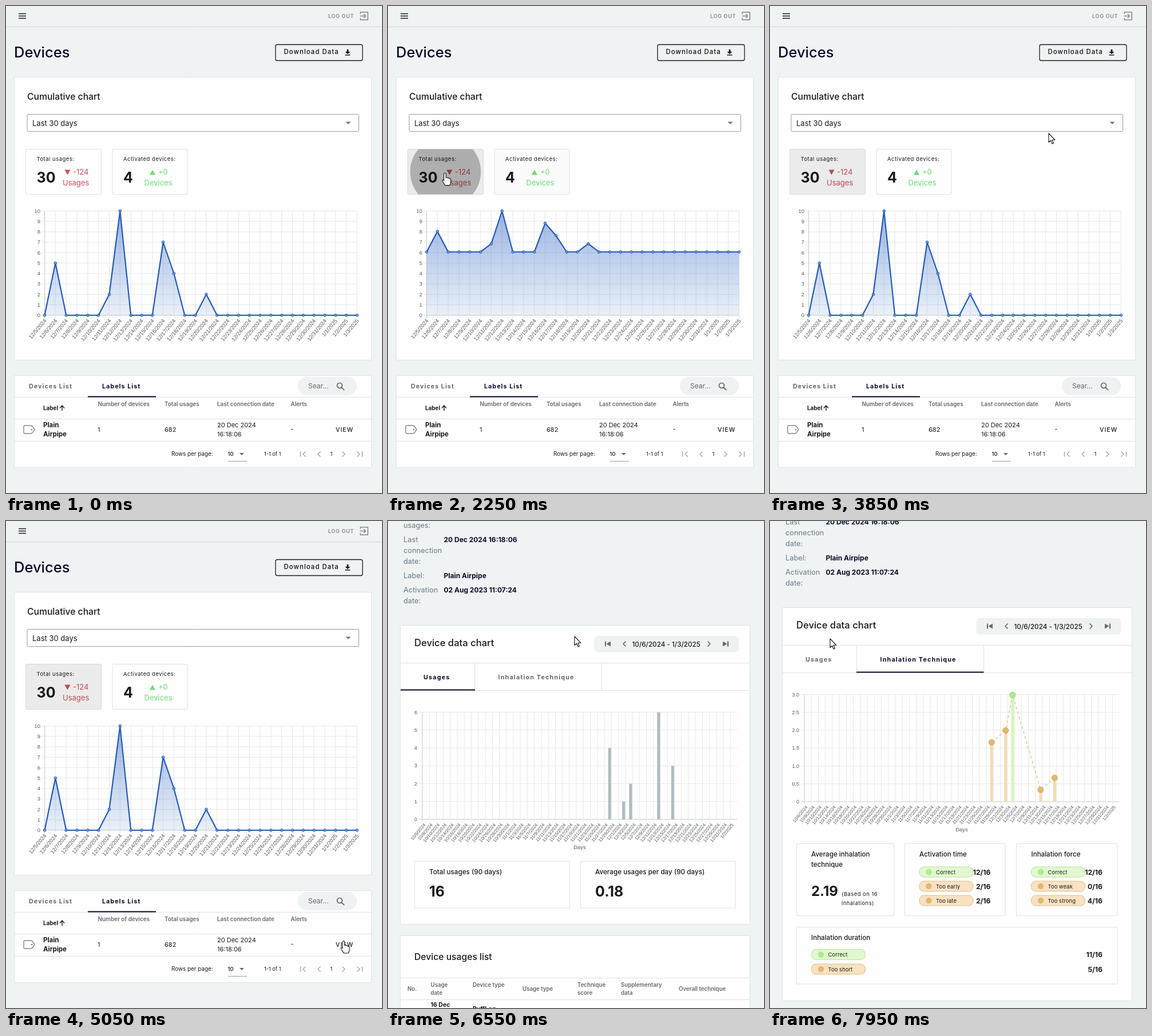
Write an HTML page with a canvas that moves like this. It is 657 px wide and 852 px high and loops after 8000 ms.

```html
<!DOCTYPE html>
<html lang="en">
<head>
<meta charset="utf-8">
<title>Device dashboard</title>
<style>
  html, body { margin: 0; width: 100%; height: 100%; overflow: hidden; background: #f0f3f3; }
  canvas { display: block; }
</style>
</head>
<body>
<canvas id="stage" width="657" height="852"></canvas>
<script>
const ctx = document.getElementById('stage').getContext('2d');
const LOOP = 8000, DAY = 864e5;
const BG = '#f0f3f3', CARD = '#fdfefd', LINE = '#dfe3e4', GRID = '#e5e9ea', AXIS = '#c6cacc';
const INK = '#1b1b1f', NAVY = '#0b0b2b', GRAY = '#66696c', SLATE = '#6b7884';
const GREEN = { bar: '#d6f6ba', dot: '#b0e986', fill: '#e1f7cf', edge: '#b9e69a' };
const ORANGE = { bar: '#f4dab2', dot: '#e4b86d', fill: '#f7e2c2', edge: '#e3bf85' };

// Event times in ms
const SHOW_DEVICES = 1766, SHOW_USAGES = 2165, OPEN_DETAIL = 5250, SCROLL = 6330, SHOW_TECHNIQUE = 7190;

const DAILY_USAGES = Array(30).fill(0);
[[1, 5], [6, 2], [7, 10], [11, 7], [12, 4], [15, 2]].forEach(([i, v]) => DAILY_USAGES[i] = v);
const USAGE_BARS = [[53, 4], [57, 1], [59, 2], [67, 6], [71, 3]];
const TECHNIQUE_BARS = [[53, 5 / 3], [57, 2], [59, 3], [67, 1 / 3], [71, 2 / 3]];

// Pointer path: time, x, y
const POINTER = [
  [1000, 76, 235], [1100, 79, 247], [1300, 79, 247], [1380, 110, 214], [1480, 215, 214], [1650, 251, 306],
  [1900, 251, 306], [2100, 100, 296], [2220, 100, 296], [2480, 92, 216], [2600, 89, 200],
  [2680, 89, 200], [3050, 180, 171], [3200, 180, 171], [3600, 430, 318], [3750, 430, 318],
  [3850, 487, 223], [3950, 487, 223], [4450, 450, 11], [4650, 450, 11], [5000, 590, 735],
  [5500, 590, 735], [5850, 352, 195], [6350, 352, 195], [6550, 326, 202], [7050, 262, 240],
  [7300, 262, 240], [7800, 105, 206]
];
const ARROW = new Path2D('M0 0V15.5L3.6 12.2 6 18 8.4 17 6 11.3H11z');
const HAND = new Path2D('M-2 1.5a1.8 1.8 0 0 1 3.6 0V7.5c1-.8 2.5-.5 3 .6 1-.7 2.4-.2 2.8 1 1.2-.5 2.6.2 2.6 1.7v4.7c0 2-1 3-1.5 5.5H.2c-1-2.5-4-5-5-8.2-.4-1.4 1.4-2.2 2.6-.8L-2 13z');

const clamp = v => Math.min(1, Math.max(0, v));
const mix = (a, b, p) => a + (b - a) * p;
const easeOut = (p, power) => 1 - (1 - clamp(p)) ** power;
const chartEase = elapsed => easeOut(elapsed / 1000, 4);

function text(str, x, y, size, color = INK, weight = 400, spacing = 0, align = 'left', family = 'Inter, sans-serif') {
  ctx.font = `${weight} ${size}px ${family}`;
  ctx.letterSpacing = spacing + 'px';
  ctx.textAlign = align;
  ctx.fillStyle = color;
  ctx.fillText(str, x, y);
}
const tickText = (str, x, y, size, align) =>
  text(str, x, y, size, '#58595b', 400, 0, align, '"Liberation Sans", Arial, sans-serif');

function box(x, y, w, h, fill, stroke, radius = 0, width = 1) {
  ctx.beginPath();
  ctx.roundRect(x, y, w, h, radius);
  if (fill) { ctx.fillStyle = fill; ctx.fill(); }
  if (stroke) { ctx.strokeStyle = stroke; ctx.lineWidth = width; ctx.stroke(); }
}
function line(x1, y1, x2, y2, color = LINE, width = 1) {
  ctx.beginPath();
  ctx.moveTo(x1, y1);
  ctx.lineTo(x2, y2);
  ctx.strokeStyle = color;
  ctx.lineWidth = width;
  ctx.stroke();
}
function disc(x, y, r, fill, stroke) {
  ctx.beginPath();
  ctx.arc(x, y, r, 0, 7);
  ctx.fillStyle = fill;
  ctx.fill();
  if (stroke) { ctx.strokeStyle = stroke; ctx.lineWidth = 1; ctx.stroke(); }
}
function icon(d, x, y, color, width) {
  const path = new Path2D(d);
  ctx.save();
  ctx.translate(x, y);
  if (width) { ctx.strokeStyle = color; ctx.lineWidth = width; ctx.stroke(path); }
  else { ctx.fillStyle = color; ctx.fill(path); }
  ctx.restore();
}
const PREVIOUS = 'M2.5-4.5L-2 0l4.5 4.5', NEXT = 'M-2.5-4.5L2 0l-4.5 4.5';
function pager(xs, y, color, width) {
  ['M-4.5-4.5v9M4.5-4.5L0 0l4.5 4.5', PREVIOUS, NEXT, 'M4.5-4.5v9M-4.5-4.5L0 0l-4.5 4.5']
    .forEach((d, i) => icon(d, xs[i], y, color, width));
}
function dateLabel(start, i, x, y, size) {
  const d = new Date(start + i * DAY);
  ctx.save();
  ctx.translate(x, y);
  ctx.rotate(-50 * Math.PI / 180);
  tickText(`${d.getUTCMonth() + 1}/${d.getUTCDate()}/${d.getUTCFullYear()}`, 0, size * .35, size, 'right');
  ctx.restore();
}

function header() {
  line(0, 36.5, 657, 36.5, '#d6d9da');
  icon('M0 0h13M0 4h13M0 8h13', 22, 13.5, INK, 1.6);
  text('LOG OUT', 563, 20.5, 9, '#85888a', 600, .7);
  icon('M.8 4V.8h13v13.4h-13V11M0 7.5h9.5M6.5 4l3.5 3.5L6.5 11', 618.5, 10, '#85888a', 1.5);
}
function downloadButton(x, y) {
  box(x, y, 152, 28, null, INK, 3, 1.3);
  text('Download Data', x + 14.5, y + 16.5, 11.4, '#111', 500, 1.05);
  icon('M-1.5-5h3v4h3L0 3.2-4.5-1h3zM-4.5 4h9v1.5h-9z', x + 126, y + 13.5, INK);
}

function statCard(x, w, title, count, change, unit, up, shade, rippleTime) {
  box(x, 250.5, w, 79, CARD, LINE, 2);
  text(title, x + 19, 270.5, 9.5, INK, 400, .5);
  text(count, x + 19, 309, 25, INK, 700);
  const color = up ? '#6fdb78' : '#cb525b', changeX = x + (up ? 80 : 82.5);
  const unitX = x + (up ? 55.5 : 64.5);
  const iconX = x + (up ? 70 : 73);
  icon(up ? 'M-5 4.5L0-4.5 5 4.5z' : 'M-5-4.5L0 4.5 5-4.5z', iconX, 291, color);
  text(change, changeX, 295, 13, color);
  text(unit, unitX, 314, 13, color);
  ctx.save();
  box(x, 250.5, w, 79, `rgba(0,0,0,${shade})`, null, 2);
  ctx.clip();
  if (rippleTime > 0 && rippleTime < 500) {
    const alpha = .26 * (1 - clamp((rippleTime - 150) / 350));
    disc(x + w / 2, 290, 97 * easeOut(rippleTime / 300, 3), `rgba(0,0,0,${alpha})`);
  }
  ctx.restore();
}

function usageChart(t) {
  const left = 67.5, right = 613.5, top = 358.5, bottom = 541;
  const max = t >= SHOW_DEVICES && t < SHOW_USAGES ? 4 : 10;
  const xAt = i => mix(left, right, i / 29);
  for (let v = 0; v <= max; v++) {
    const y = mix(bottom, top, v / max);
    line(left - 5, y, right, y, v ? GRID : AXIS);
    tickText(v, 60, y + 3, 9.4, 'right');
  }
  DAILY_USAGES.forEach((_, i) => {
    line(xAt(i), top, xAt(i), bottom + 5, i ? GRID : AXIS);
    dateLabel(Date.UTC(2024, 11, 5), i, xAt(i) + 1, 549, 9.4);
  });
  const toDevices = chartEase(Math.min(t, SHOW_USAGES) - SHOW_DEVICES);
  const toUsages = chartEase(t - SHOW_USAGES);
  const points = DAILY_USAGES.map((v, i) => {
    const share = v / 10;
    return [xAt(i), mix(bottom, top, mix(mix(share, 1, toDevices), share, toUsages))];
  });
  const gradient = ctx.createLinearGradient(0, top, 0, bottom);
  gradient.addColorStop(0, 'rgba(36,88,190,.45)');
  gradient.addColorStop(1, 'rgba(36,98,200,.09)');
  ctx.beginPath();
  points.forEach(p => ctx.lineTo(...p));
  ctx.strokeStyle = '#2659b5';
  ctx.lineWidth = 2.2;
  ctx.lineJoin = 'round';
  ctx.stroke();
  ctx.lineTo(right, bottom);
  ctx.lineTo(left, bottom);
  ctx.fillStyle = gradient;
  ctx.fill();
  points.forEach(([x, y]) => disc(x, y, 2.3, 'rgba(110,155,225,.75)', '#2659b5'));
}

function labelsTable() {
  box(14.5, 646.5, 624, 161, CARD, LINE);
  [684.5, 722.5, 761.5].forEach(y => line(15, y, 638, y));
  text('Devices List', 40, 669, 10.8, GRAY, 700, 1);
  text('Labels List', 168, 669, 10.8, NAVY, 700, 1);
  box(143, 682.5, 119, 2, NAVY);
  box(510, 649, 103, 32, '#eff2f2', null, 16);
  text('Sear...', 528, 669, 12, GRAY);
  icon('M4.5 0a4.5 4.5 0 1 1-9 0a4.5 4.5 0 1 1 9 0M3.2 3.2l5 5', 583, 664, GRAY, 1.7);

  text('Label', 65, 707, 9.9, INK, 700);
  icon('M0 4.5v-9M-4 0l4-4.5L4 0', 98, 703.5, INK, 1.4);
  [['Number of devices', 160.5], ['Total usages', 277], ['Last connection date', 369], ['Alerts', 497.5]]
    .forEach(([s, x]) => text(s, x, 699.5, 9.9, GRAY, 600));

  icon('M2 0h10.5q1.5 0 2.5 1.2L19 7l-4 5.8q-1 1.2-2.5 1.2H2q-2 0-2-2V2q0-2 2-2z', 31, 734, '#85888b', 1.4);
  disc(45, 741, 1.3, '#85888b');
  text('Plain', 65, 737, 11.5, INK, 700);
  text('Airpipe', 65, 753, 11.5, INK, 700);
  text('1', 160, 745, 11);
  text('682', 277, 745, 11);
  text('20 Dec 2024', 369, 736.5, 11);
  text('16:18:06', 369, 753, 11);
  text('-', 497.5, 744, 11);
  text('VIEW', 576, 745, 10.5, INK, 500, 1);

  text('Rows per page:', 289, 787, 9.9);
  text('10', 387.5, 787, 9.4, NAVY, 500);
  icon('M-4-2h8L0 2z', 412, 784, GRAY);
  line(388, 796.5, 421, 796.5, '#999c9f');
  text('1-1 of 1', 451, 787, 9.2);
  text('1', 566.5, 787, 9.2, NAVY);
  pager([519, 547, 590, 618], 784, '#a2a6a8', 1.4);
}

function overview(t, over) {
  header();
  text('Devices', 14, 90, 25.5, NAVY, 500);
  downloadButton(471, 67.5);
  box(14.5, 124.5, 624, 495, CARD, LINE);
  text('Cumulative chart', 37, 164, 15.7, INK, 500);
  box(37, 189.5, 579.5, 30, CARD, over.select ? '#222' : '#999c9e', 2);
  text('Last 30 days', 46, 209.5, 13);
  icon('M-4.5-2h9L0 2.5z', 598, 204.5, '#777');
  statCard(34.5, 132, 'Total usages:', '30', '-124', 'Usages', false,
    t > SHOW_USAGES ? .075 : over.usagesCard ? .05 : 0, t - SHOW_USAGES);
  statCard(186, 131, 'Activated devices:', '4', '+0', 'Devices', true, over.devicesCard ? .05 : 0, t - SHOW_DEVICES);
  usageChart(t);
  labelsTable();
}

function detailChart(t, technique) {
  const left = 60, right = 610.5, top = 539.5, bottom = 727, step = (right - left) / 90;
  const max = technique ? 3 : 6;
  const xAt = i => left + (i + .5) * step;
  for (let k = 0; k <= 6; k++) {
    const y = mix(bottom, top, k / 6);
    line(left - 5, y, right, y, k ? GRID : AXIS);
    tickText(technique && k ? (k / 2).toFixed(1) : k, 51, y + 3, 9, 'right');
  }
  for (let i = 0; i < 90; i += 2) {
    const x = left + i * step;
    line(x, top, x, bottom + 4, i ? GRID : AXIS);
    dateLabel(Date.UTC(2024, 9, 6), i, xAt(i) + 1, 735, 8);
  }
  tickText('Days', 335, 779, 9.4, 'center');

  const grow = chartEase(t - (technique ? SHOW_TECHNIQUE : OPEN_DETAIL));
  const bars = (technique ? TECHNIQUE_BARS : USAGE_BARS).map(([i, v]) => ({
    x: xAt(i), y: mix(bottom, top, v / max * grow), tone: v === 3 ? GREEN : ORANGE
  }));
  bars.forEach(b => box(b.x - 2.5, b.y, 5, bottom - b.y, technique ? b.tone.bar : '#b1babf'));
  if (!technique) return;
  ctx.beginPath();
  bars.forEach(b => ctx.lineTo(b.x, b.y));
  ctx.setLineDash([5, 4]);
  ctx.strokeStyle = '#e6cc98';
  ctx.lineWidth = 1.6;
  ctx.stroke();
  ctx.setLineDash([]);
  bars.forEach(b => disc(b.x, b.y, 5, b.tone.dot, b.tone === GREEN ? '#95d46b' : '#d0a764'));
}

function scoreRow(label, score, x, right, y) {
  const tone = label === 'Correct' ? GREEN : ORANGE;
  box(x, y - 9, 94, 18, tone.fill, tone.edge, 8);
  disc(x + 16.5, y, 5.2, tone.dot);
  text(label, x + 29, y + 3.5, 9.4, INK, 400, .1);
  text(score, right, y + 4.5, 12.2, INK, 700, 0, 'right');
}

function usagesContent() {
  [[46.5, 271, 'Total usages (90 days)', '16'], [336.5, 270.5, 'Average usages per day (90 days)', '0.18']]
    .forEach(([x, w, title, value]) => {
      box(x, 800.5, w, 81.5, CARD, LINE);
      text(title, x + 25.5, 823, 11.7, INK, 500);
      text(value, x + 25.5, 861.5, 25, INK, 700);
    });
  box(21.5, 930.5, 611, 400, CARD, LINE);
  text('Device usages list', 46, 973, 15.7, INK, 500);
  [1004.5, 1042.5].forEach(y => line(22, y, 632, y));
  [['No.', 34, 1027], ['Usage', 74.5, 1020], ['date', 74.5, 1034], ['Device type', 148, 1020],
   ['Usage type', 235, 1027], ['Technique', 331, 1020], ['score', 331, 1034],
   ['Supplementary', 407, 1020], ['data', 407, 1034], ['Overall technique', 508, 1027]]
    .forEach(([s, x, y]) => text(s, x, y, 9.7, GRAY, 600));
  [['16 Dec', 74.5, 1054.5], ['2024', 74.5, 1069], ['PuffLog', 148, 1062], ['Breezetube', 148, 1076.5]]
    .forEach(([s, x, y]) => text(s, x, y, 10.5, INK, 700));
}

function techniqueContent() {
  [[46.5, 170], [235.5, 175.5], [430.5, 176.5]].forEach(([x, w]) => box(x, 800.5, w, 126, CARD, LINE));
  box(46.5, 946.5, 560.5, 99.5, CARD, LINE);
  [['Average inhalation', 72, 823], ['technique', 72, 841], ['Activation time', 261, 823],
   ['Inhalation force', 456.5, 823], ['Inhalation duration', 72, 968.5]]
    .forEach(([s, x, y]) => text(s, x, y, 11.6, INK, 500));
  text('2.19', 72, 892, 24, INK, 700);
  text('(Based on 16', 125, 892, 9.4, INK, 400, .5);
  text('inhalations)', 125, 908, 9.4, INK, 400, .5);
  [['Correct', '12/16'], ['Too early', '2/16'], ['Too late', '2/16']]
    .forEach(([s, v], i) => scoreRow(s, v, 261, 385.5, 850 + i * 25));
  [['Correct', '12/16'], ['Too weak', '0/16'], ['Too strong', '4/16']]
    .forEach(([s, v], i) => scoreRow(s, v, 456.5, 581, 850 + i * 25));
  [['Correct', '11/16'], ['Too short', '5/16']]
    .forEach(([s, v], i) => scoreRow(s, v, 72.5, 581, 994.5 + i * 25.5));
}

function rangePicker() {
  box(360.5, 406, 252.5, 28.5, '#eff2f2', null, 6);
  icon('M-5-4.5h2v9h-2zM5-4.5v9L-2.5 0z', 384, 420, GRAY);
  icon(PREVIOUS, 413, 420, GRAY, 1.7);
  icon(NEXT, 561, 420, GRAY, 1.7);
  icon('M5-4.5h-2v9h2zM-5-4.5v9L2.5 0z', 590, 420, GRAY);
  text('10/6/2024 - 1/3/2025', 426.5, 424.5, 11.7, INK, 500);
}

function detail(t, scroll) {
  const technique = t >= SHOW_TECHNIQUE;
  ctx.save();
  ctx.translate(0, -scroll);
  header();
  icon('M9 0H1M4.5-3.8L.8 0l3.7 3.8', 28, 70, '#53606f', 1.4);
  text('Devices', 45, 74, 11.3, '#5c6b7c');
  downloadButton(458.5, 62.5);
  text('DA:41:07:65:3C:9E', 27, 112, 24, NAVY, 500);
  [['Device', 155], ['type:', 173.5], ['Total', 198], ['usages:', 216.5], ['Last', 242], ['connection', 261],
   ['date:', 280], ['Label:', 305], ['Activation', 329.5], ['date:', 348.5]]
    .forEach(([s, y]) => text(s, 27, y, 12.8, SLATE));
  [['PuffLog Breezetube', 154.5], ['682', 198], ['20 Dec 2024 16:18:06', 242], ['Plain Airpipe', 305],
   ['02 Aug 2023 11:07:24', 329.5]]
    .forEach(([s, y]) => text(s, 97.5, y, 12, NAVY, 700));

  box(21.5, 387.5, 611, technique ? 688 : 523, CARD, LINE);
  text('Device data chart', 46, 424, 16.6, INK, 500);
  rangePicker();
  [453.5, 501.5].forEach(y => line(22, y, 632, y));
  [151.5, 373.5].forEach(x => line(x, 454, x, 502));
  text('Usages', 62, 482, 10.8, technique ? GRAY : NAVY, 700, 1.15);
  text('Inhalation Technique', 192.5, 482, 10.8, technique ? NAVY : GRAY, 700, 1.15);
  box(technique ? 151 : 22, 499.5, technique ? 222.5 : 130, 2, NAVY);
  detailChart(t, technique);
  if (technique) techniqueContent(); else usagesContent();
  ctx.restore();
}

function pointerAt(t) {
  if (t < POINTER[0][0]) return null;
  const next = POINTER.findIndex(k => k[0] > t);
  if (next < 0) return POINTER.at(-1).slice(1);
  const [t0, x0, y0] = POINTER[next - 1], [t1, x1, y1] = POINTER[next];
  const raw = (t - t0) / (t1 - t0), p = raw * raw * (3 - 2 * raw);
  return [mix(x0, x1, p), mix(y0, y1, p)];
}

function draw(t) {
  const onDetail = t >= OPEN_DETAIL;
  const scroll = Math.round(236 * easeOut((t - SCROLL) / 346, 2));
  const pointer = pointerAt(t);
  const inside = (x, y, w, h) => !!pointer &&
    pointer[0] >= x && pointer[0] <= x + w && pointer[1] >= y && pointer[1] <= y + h;
  const over = onDetail
    ? { tabs: inside(22, 454 - scroll, 351, 48) }
    : {
        select: inside(37, 189, 580, 30),
        usagesCard: inside(34, 250, 132, 79),
        devicesCard: inside(186, 250, 131, 79),
        view: inside(568, 728, 48, 26)
      };
  ctx.fillStyle = BG;
  ctx.fillRect(0, 0, 657, 852);
  if (onDetail) detail(t, scroll); else overview(t, over);
  if (!pointer) return;
  const shape = Object.values(over).some(Boolean) ? HAND : ARROW;
  ctx.save();
  ctx.translate(...pointer);
  ctx.fillStyle = '#fff';
  ctx.fill(shape);
  ctx.strokeStyle = '#111';
  ctx.lineWidth = 1.1;
  ctx.stroke(shape);
  ctx.restore();
}

const start = performance.now();
function tick() {
  draw((performance.now() - start) % LOOP);
  requestAnimationFrame(tick);
}
tick();
</script>
</body>
</html>
```
